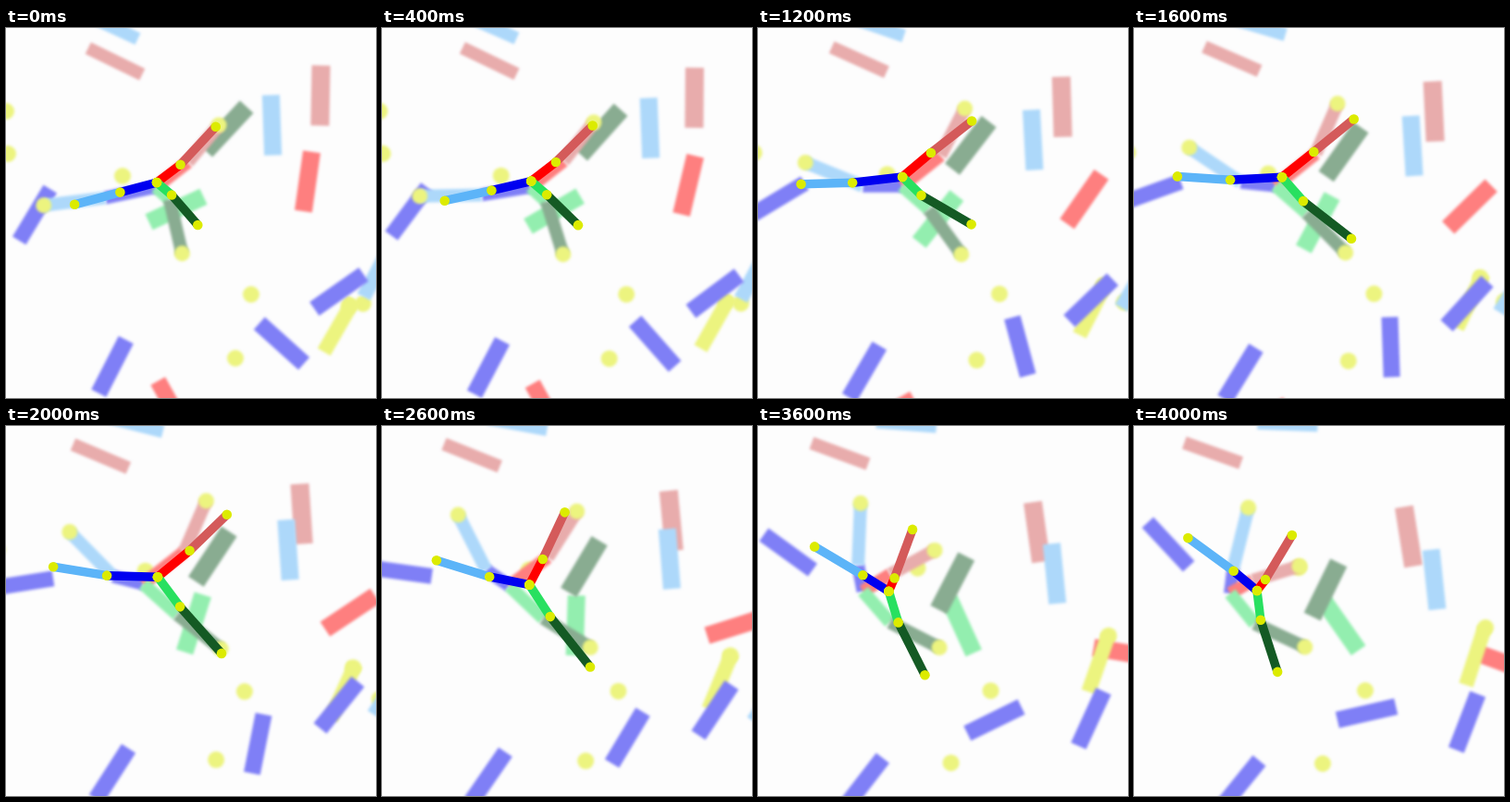
Write an HTML page with a canvas that moves like this. It is 400 px wide and 400 px high and loops after 4.2 s.

```html
<!DOCTYPE html>
<html>
<head>
<meta charset="utf-8">
<style>
html, body { margin: 0; width: 100%; height: 100%; overflow: hidden; background: #fdfdfe; }
canvas { display: block; width: 400px; height: 400px; }
</style>
</head>
<body>
<canvas id="stage" width="400" height="400"></canvas>
<script>
const ctx = document.getElementById('stage').getContext('2d');
const LOOP = 4200, STEP = 200, LAST = 19;

const BLUE = '#0000f0', SKY = '#5cb4f8', RED = '#ff0000', ROSE = '#d45a5a';
const GREEN = '#28e060', PINE = '#145a24', YELLOW = '#dceb00';

// Motions are a constant, or values spread evenly over the loop.
// Bars: colour, width, x, y, angle in degrees.
const bars = [
  [ROSE, 14, [118, 85], [36, 29], [26, 19.5]],
  [SKY, 14, [113, 166], -2, [25, 2]],
  [ROSE, 20, [340, 297], [73, 119.5], [91, 81]],
  [SKY, 19, [287.5, 324.5], [105, 166], [88, 84]],
  [RED, 19, [326, 374, 400], [166, 204, 256], [98, 200]],
  [BLUE, 17, [31, 19, 37], [202, 168, 128], [121, 227]],
  [BLUE, 18, 115, [366, 387], [117, 129]],
  [BLUE, 18, [298, 271, 251.5], [341, 343, 310.5], [42, 167]],
  [YELLOW, 16, [360, 369], [322, 249], [120, 108]],
  [SKY, 16, [402, 430], [262, 310], [118, 128]],
  [BLUE, 18, 360, [285, 320], [145, 111]],
  [RED, 18, [180, 150], [410, 470], 61],
  [GREEN, 19, [184, 224], [196, 214, 216], [155, 55]],
  [PINE, 20, [238, 207], [109, 177], [133, 123, 116]]
];
const BAR_LENGTH = 65;

// Dots: x, y.
const dots = [
  [[265, 250], [288, 286]],
  [[248, 204], [357, 365]],
  [[2, -22], [136, 132]],
  [[0, -50], [90, 86]],
  [[386, 424], [298, 292]],
  [[371, 380], [300, 218]],
  [[126, 178], [160, 153]]
];

// Walkers: a hub with three arms of two bones; each bone has a length and an angle.
const ghost = {
  hub: [[162, 147, 104], [172, 171, 181]],
  arms: [
    [[[56, 33, 28], [168, 197, 277]], [67, [173, 284]]],
    [[[44, 56, 28], [-38, -38, -30]], [[52, 60, 53], [-50, -66, -17]]],
    [[[20, 50, 42], [42, 42, 51]], [60, [77, 37, 25]]]
  ]
};
const body = {
  hub: [[163, 156, 164, 152, 133], [167, 161, 164, 178, 178]],
  arms: [
    [[[41, 54, 54, 35, 33], [165, 183, 220]], [[51, 59, 61], [165, 216]]],
    [[[32, 40, 44, 19, 15], [-37, -40, -41, -78, -53]], [56, [-47, -38, -46, -78, -59]]],
    [[[21, 28, 41, 39, 32], [40, 44, 54, 61, 83]], [[43, 62, 68, 69, 59], [49, 30, 50, 53, 72]]]
  ]
};
const ARM_COLORS = [[BLUE, SKY], [RED, ROSE], [GREEN, PINE]];

// Smooth curve through evenly spaced values, u from 0 to 1.
function curve(v, u) {
  if (typeof v === 'number') return v;
  const n = v.length - 1, i = Math.min(n - 1, Math.floor(u * n)), s = u * n - i;
  const a = v[i], b = v[i + 1];
  const before = i > 0 ? v[i - 1] : 2 * a - b;
  const after = i < n - 1 ? v[i + 2] : 2 * b - a;
  const m0 = (b - before) / 2, m1 = (after - a) / 2, r = 1 - s;
  return a * r * r * (1 + 2 * s) + b * s * s * (3 - 2 * s) + s * r * (m0 * r - m1 * s);
}

const radians = degrees => degrees * Math.PI / 180;

function bar(color, width, x, y, angle) {
  ctx.save();
  ctx.translate(x, y);
  ctx.rotate(radians(angle));
  ctx.fillStyle = color;
  ctx.fillRect(-BAR_LENGTH / 2, -width / 2, BAR_LENGTH, width);
  ctx.restore();
}

function dot(r, x, y) {
  ctx.fillStyle = YELLOW;
  ctx.beginPath();
  ctx.arc(x, y, r, 0, 2 * Math.PI);
  ctx.fill();
}

function bone(color, width, from, to) {
  ctx.strokeStyle = color;
  ctx.lineWidth = width;
  ctx.beginPath();
  ctx.moveTo(...from);
  ctx.lineTo(...to);
  ctx.stroke();
}

// Draws the bones and returns the joints of each arm, from hub to tip.
function walker({ hub, arms }, width, u) {
  const start = hub.map(v => curve(v, u));
  return arms.map((arm, i) => {
    const joints = [start];
    arm.forEach(([length, angle], j) => {
      const [x, y] = joints[j], l = curve(length, u), a = radians(curve(angle, u));
      joints.push([x + l * Math.cos(a), y + l * Math.sin(a)]);
      bone(ARM_COLORS[i][j], width, joints[j], joints[j + 1]);
    });
    return joints;
  });
}

function draw(u) {
  ctx.fillStyle = '#fdfdfe';
  ctx.fillRect(0, 0, 400, 400);

  ctx.filter = 'blur(1.8px)';
  for (const [x, y] of dots) dot(9, curve(x, u), curve(y, u));
  for (const [color, width, ...motion] of bars)
    bar(color, width, ...motion.map(v => curve(v, u)));
  for (const joints of walker(ghost, 14, u)) dot(8.5, ...joints[2]);

  // Fade the blurred layer to half strength.
  ctx.filter = 'none';
  ctx.fillStyle = 'rgba(253, 253, 254, 0.5)';
  ctx.fillRect(0, 0, 400, 400);

  for (const joint of walker(body, 9.5, u).flat()) dot(5.3, ...joint);
}

let shown = -1;
function tick() {
  const t = performance.now() % LOOP;
  const k = Math.min(LAST, Math.max(0, Math.floor(t / STEP) - 1));
  if (k !== shown) draw((shown = k) / LAST);
  requestAnimationFrame(tick);
}
tick();
</script>
</body>
</html>
```
